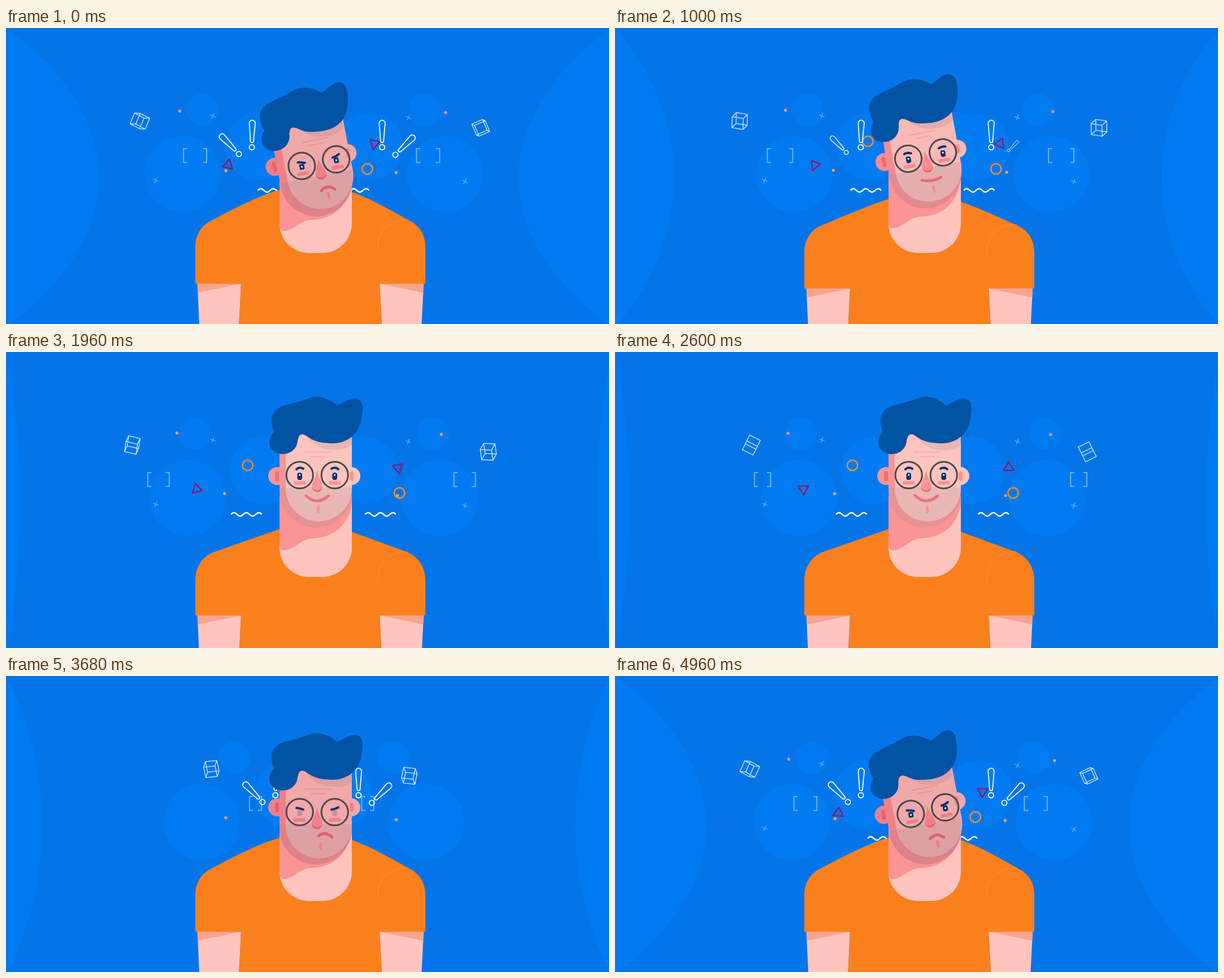
An HTML page with a canvas for the animation above (5000 ms loop, 1067 by 525 pixels).

```html
<!DOCTYPE html>
<html lang="en">
<head>
<meta charset="utf-8">
<title>Mood</title>
<style>
html, body { margin: 0; width: 100%; height: 100%; overflow: hidden; background: #0375e9; }
canvas { display: block; }
</style>
</head>
<body>
<canvas id="stage" width="1067" height="525"></canvas>
<script>
const ctx = document.getElementById('stage').getContext('2d');
const LOOP = 5000, BURST = 3350, MID = 540;
const SIDES = [-1, 1];
const SOFT_WHITE = 'rgba(255,255,255,.42)', LIGHT = '#027bf2';
ctx.lineCap = ctx.lineJoin = 'round';

const clamp = v => Math.max(0, Math.min(1, v));
const smooth = (from, to, v) => {
  const p = clamp((v - from) / (to - from));
  return p * p * (3 - 2 * p);
};

// Blend the numbers of two equally built strings (paths or colours).
function mix(a, b, s) {
  const num = /-?[\d.]+/g, to = b.match(num);
  let i = 0;
  return a.replace(num, v => +(+v + (to[i++] - v) * s).toFixed(3));
}

function fill(d, color) {
  ctx.fillStyle = color;
  ctx.fill(new Path2D(d));
}
function line(d, color, width) {
  ctx.strokeStyle = color;
  ctx.lineWidth = width;
  ctx.stroke(new Path2D(d));
}
function disc(x, y, r, color) {
  ctx.beginPath();
  ctx.arc(x, y, r, 0, 7);
  ctx.fillStyle = color;
  ctx.fill();
}
function ring(x, y, r, color, width) {
  ctx.beginPath();
  ctx.arc(x, y, r, 0, 7);
  ctx.strokeStyle = color;
  ctx.lineWidth = width;
  ctx.stroke();
}
function pill(x, y, w, h, r, color) {
  ctx.beginPath();
  ctx.roundRect(x, y, w, h, r);
  ctx.fillStyle = color;
  ctx.fill();
}
function place(x, y, deg, scale, draw) {
  ctx.save();
  ctx.translate(x, y);
  ctx.rotate(deg * Math.PI / 180);
  ctx.scale(scale, scale);
  draw();
  ctx.restore();
}

// u is the time since the parts burst out from behind the head.
let u = 0;
const gather = x => x + (MID - x) * Math.max(clamp((u - 4350) / 650), 1 - clamp(u / 300)) ** 3;
const drift = (far, reach, power) => gather(far + reach * (1 - u / LOOP) ** power);
const pop = () => Math.exp((330 - u) / 230);
const sway = peak => Math.cos((u - peak) * Math.PI / 2000);
const shown = (from, to) => clamp((u - from) / 250) * clamp((to - u) / 200);

function backdrop(t) {
  ctx.fillStyle = '#0375e9';
  ctx.fillRect(0, 0, 1067, 525);
  const w = (t + 3800) % LOOP;
  const c = (25 + 172 * smooth(1500, 4700, w) * (1 - smooth(4580, LOOP, w))) * 4 / 3;
  for (const side of SIDES) {
    ctx.save();
    ctx.translate(side < 0 ? 0 : 1071, 0);
    ctx.scale(-side, 1);
    fill(`M0 0C${c} 160 ${c} 370 0 530Z`, LIGHT);
    ctx.restore();
    const circle = (away, speed, jump, y, r) =>
      disc(gather(544.5 + side * Math.max(0, away + speed * u - jump * pop())), y, r, LIGHT);
    circle(184, .0075, 46, 145, 28.5);
    circle(240, -.0048, 40, 259, 67.5);
    circle(106, -.0048, 62, 210, 60);
  }
}

function cube(side, y, rx) {
  const turn = Math.abs((u - 2900) / 2570), rad = Math.PI / 180;
  const ry = (35 - 55 * (1 - u / LOOP) ** 2) * rad;
  rx *= rad;
  const corner = n => {
    const [a, b, c] = [1, 2, 4].map(bit => n & bit ? 10.5 : -10.5);
    const depth = c * Math.cos(rx) - b * Math.sin(rx);
    return [a * Math.cos(ry) + depth * Math.sin(ry), b * Math.cos(rx) + c * Math.sin(rx)].map(v => v.toFixed(2));
  };
  let d = '';
  for (let n = 0; n < 8; n++)
    for (const bit of [1, 2, 4])
      if (!(n & bit)) d += `M${corner(n)}L${corner(n | bit)}`;
  ctx.save();
  ctx.translate(gather(538.5 + side * (318 - 143 * turn ** 3)), y);
  ctx.scale(-side, 1);
  place(0, 0, 84 * turn ** 1.8 - 90, 1, () => line(d, 'rgba(255,255,255,.8)', 1.4));
  ctx.restore();
}

function brackets() {
  const a = drift(246, 227, 3), b = a + 15 + 30 * Math.sin(Math.PI * u / LOOP);
  ctx.lineCap = 'butt';
  ctx.lineJoin = 'miter';
  for (const [l, r] of [[a, b], [1081.5 - b, 1081.5 - a]])
    line(`M${l + 6.5} 214H${l}V238.500H${l + 6.5}M${r - 6.5} 214H${r}V238.500H${r - 6.5}`, SOFT_WHITE, 2);
  ctx.lineCap = ctx.lineJoin = 'round';
}

function wave(x) {
  let d = '';
  for (let i = 0; i <= 53; i++)
    d += `${i ? 'L' : 'M'}${x + i - 26.5} ${288 - 3 * Math.cos((i - 4.5) * Math.PI / 11)}`;
  line(d, '#fff', 2.5);
}

// Exclamation mark that shrinks, then bursts into four strokes at time end.
function mark(side, x, y, lean, end, t) {
  const p = (t - end) / 280;
  if (p > 0 && p < 1) {
    const outer = 14 * (1 - (1 - p) ** 2), inner = 14 * Math.max(0, (p - .35) / .65);
    for (let i = 0; i < 4; i++)
      place(x - 1, y - 4, 45 + 90 * i, 1, () => line(`M${inner} 0H${outer}`, '#fff', 2));
  }
  const size = t > BURST ? 1 : clamp((end - t) / 180);
  if (!size) return;
  place(x - side * 42 * pop(), y, lean, size, () => {
    line('M-5.3 -21A5.3 5.3 0 0 1 5.3 -21L2.6 11Q2.2 13.3 0 13.3Q-2.2 13.3 -2.6 11Z', '#fff', 1.7);
    ring(0, 21.5, 4.6, '#fff', 1.8);
  });
}

function floaters(t) {
  brackets();
  cube(-1, 165, 28 * Math.cos((u - 1050) * Math.PI / 6400));
  cube(1, 177, 28 * Math.cos((u - 725) * Math.PI / 2350));

  const plus = (x, y, from) => place(x, y, 20 + 100 * Math.exp(-u / 700), shown(from, 4850),
    () => line('M-4.5 0H4.5M0 -4.5V4.5', SOFT_WHITE, 1.3));
  plus(366, 156, 530);
  plus(712, 159, 530);
  plus(265, 270, 920);
  plus(812, 272.5, 530);

  const dot = (x, y, peak, reach, size, color) =>
    disc(x + reach * sway(peak), y + reach / 2 * sway(1800), 2.6 * size, color);
  dot(305, 145.5, 1050, 4, shown(420, 4800), '#fb9494');
  dot(774, 148, 1800, 4, shown(420, 4800), '#fb9494');
  dot(388, 252, 1050, 2, shown(0, 4900), '#fba45c');
  dot(691.5, 255.5, 3050, 2, shown(0, 4900), '#fba45c');

  const spin = 530 - 930 * (1 - u / 6500) ** 2;
  const triangle = (x, y, deg) => place(x, y, deg, 1, () => line('M0 -10.4L9 5.2H-9Z', '#8a1a6a', 2.4));
  triangle(drift(333, 200, 3), 243, spin);
  triangle(drift(697, -150, 3), 205, spin + 60);

  ring(drift(417, 138, 2), 201, 9.2, '#f98a28', 2.5);
  ring(drift(708, -153, 2), 250, 9.2, '#f98a28', 2.5);
  for (const side of SIDES) wave(drift(544 + side * 128.5, -side * 128, 2));

  mark(-1, 397, 208, -44, 1148, t);
  mark(-1, 435.3, 190, 1, 1300, t);
  mark(1, 665.7, 190, 0, 1218, t);
  mark(1, 704.3, 209.7, 45, 1090, t);
}

function body(s) {
  ctx.save();
  ctx.translate(0, 467.3 - 13.7 * s);
  fill('M338.700 0H416L412 80H342.300Z M661 0H739L735 80H665.500Z', '#ffc4be');
  fill('M338.700 0H416L339.500 16Z M661 0H739L738.300 16Z', '#fca38c');
  fill('M415.700 -1H661.300L665.500 80H412Z', '#fa801e');
  ctx.restore();

  fill(mix(
    'M484 314C446 327 408 341 370 354C350 360 335 380 335 404V467.300H742V404C742 380 727 360 707 354C676 342 644 331 612 319Z',
    'M484 287C445 298 400 322 359 344C344 352 335 369 335 388V453.600H742V388C742 370 734 353 718 344C685 326 650 304 612 291Z', s), '#fa801e');
  line(mix('M658 406C655 380 675 352 710 354', 'M658 390C655 365 675 338 712 341', s), '#ff9138', 1);

  fill('M484 255H612V347A52 52 0 0 1 560 399H536A52 52 0 0 1 484 347Z', '#ffc4be');
  fill(mix(
    'M484 255V344Q485 352 493 352C512 350 520 331 546 330C585 329 612 298 612 262V255Z',
    'M484 255V353Q485 361 493 360C512 358 518 340 546 340C578 338 600 318 608 290V255Z', s), '#fb9494');
}

function head(t, s) {
  const leaning = 1 - smooth(1400, 1780, t) + smooth(4500, 4880, t);
  const lean = leaning * s;
  const hop = 7 * Math.sin(Math.PI * clamp((t - 1020) / 380));
  const tone = (a, b) => mix(`rgb(${a})`, `rgb(${b})`, s);
  const skin = tone('255,196,190', '240,168,168');
  const pink = tone('251,148,148', '240,128,136');
  const deep = tone('233,115,125', '225,98,110');
  const navy = '#06336f';

  place(548, 240 + 23 * s - hop, -10 * leaning - .8 * lean, 1, () => {
    ctx.translate(-548, -240);
    const earY = 220 - 10 * s;
    disc(480, earY, 16, pink);
    pill(476, earY - 9, 7, 18, 3.5, deep);
    disc(611, earY, 16, skin);
    fill('M484 130H612V247A64 64 0 0 1 484 247Z', pink);
    place(2.5 * lean, -lean, 0, 1, () => fill('M495 130H612V242A58.5 58.5 0 0 1 495 242Z', skin));
    fill('M484 240H612V247A64 64 0 0 1 484 247Z', 'rgba(145,131,145,.2)');
    pill(608, earY - 8, 7, 16, 3.5, pink);
    fill('M525 140C540 165 560 174 582 174C596 174 605 170 612 165V140Z', 'rgba(150,120,140,.2)');

    // The features slide sideways as the sad head leans.
    place(7.5 * lean, -lean, 0, 1, () => {
      line('M529 177.500H575M539 185.500H565', tone('240,176,172', '226,150,154'), 2);
      for (const x of [509, 571]) pill(x, 229, 21.5, 6.5, 3, pink);
      fill('M550.500 209C549 222 541 231 541 239.500A9.500 9.500 0 0 0 560 239.500C560 231 552 222 550.500 209Z', pink);
      fill('M541 238A9.500 10.500 0 0 0 560 238Q558 245 550.500 245Q543 245 541 238Z', deep);

      const shut = t > 3540 && t < 3800;
      for (const x of [519.7, 581.7]) {
        pill(x - 4.3, 214 + s, 8.6, 13 - 3 * s, 4 - 2 * s, shut ? 'rgb(205,140,150)' : navy);
        if (!shut) disc(x, 218 + 2 * s, 1.6, '#fff');
        ring(x, 218.3, 23.6, '#484a4e', 3);
      }
      line(mix('M514 208Q519 203 526 207', 'M514 211Q518 211 526 214', s), navy, 4);
      line(mix('M576 207Q583 203 588 208', 'M576 214Q583 213 588 210', s), navy, 4);
      pill(550 + 4.5 * s, 273, 5, 13, 2.5, pink);
    });
    place(0, 6 * lean, 0, 1, () =>
      line(mix('M531 255Q550.5 273 571 255', 'M553 261Q565 251 577 263', s), deep, 5));

    ctx.translate(0, 2.5 * lean - s);
    fill('M586 95C575 85 562 79.500 550 79.500C540 79.500 534 83 525 86L492 95C475 100 470 112 470 122C470 130 472 137 474 142C469 147 466 153 466 160C466 172 476 181 490 181C505 181 515 170 516 158C517 150 520 146 524 146C529 146 533 150 538 153C548 160 565 162 580 162C612 160 630 140 631 100C631 85 622 80 610 83Z', '#0052a3');
  });
}

function frame(now) {
  const t = now % LOOP;
  u = (t - BURST + LOOP) % LOOP;
  const sad = 1 - smooth(800, 1150, t) + smooth(2920, 3450, t);
  backdrop(t);
  floaters(t);
  body(sad);
  head(t, sad);
  requestAnimationFrame(frame);
}
requestAnimationFrame(frame);
</script>
</body>
</html>
```
